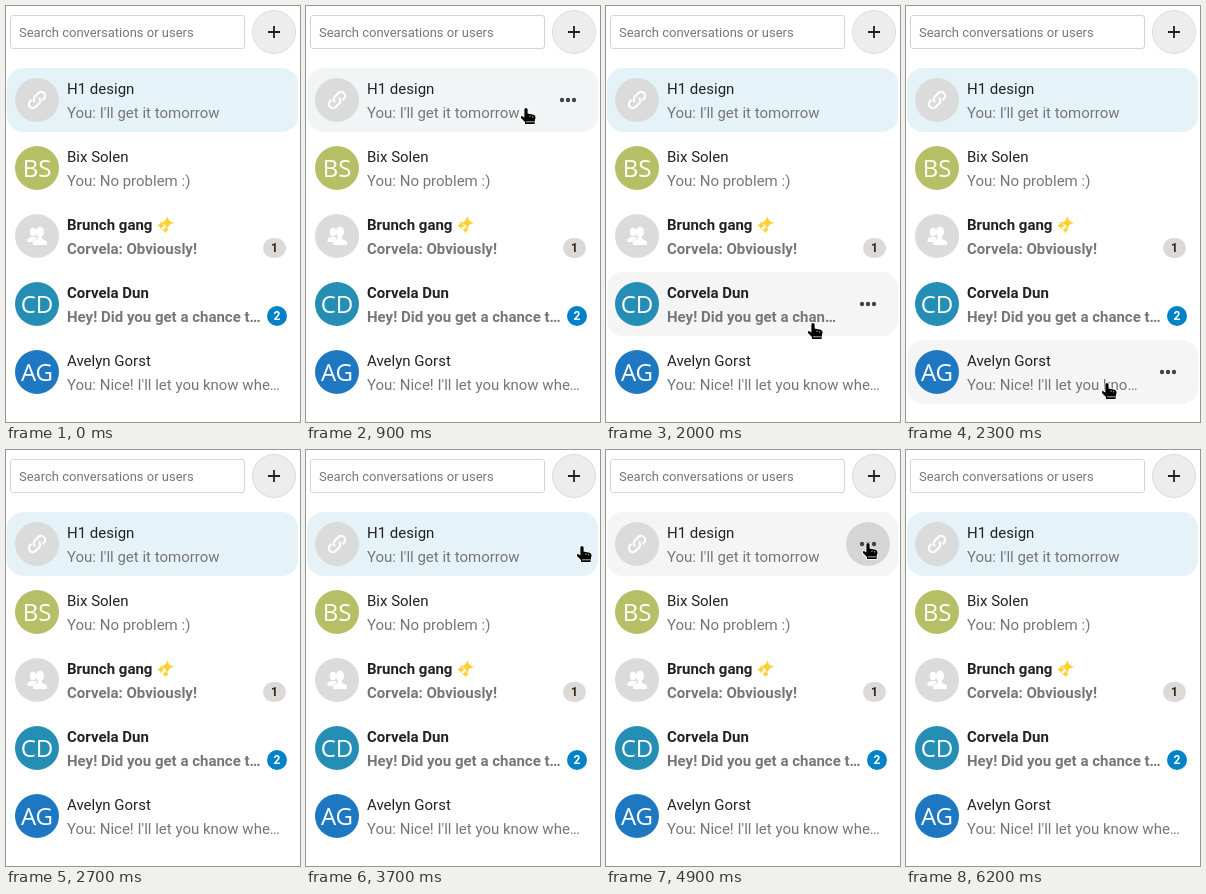
Animation of 294x416 px, one loop 8300 ms. Source, as an HTML page:

```html
<!DOCTYPE html>
<html lang="en">
<head>
<meta charset="utf-8">
<title>Conversation list</title>
<style>
  html, body { margin: 0; width: 100%; height: 100%; overflow: hidden; background: #fff; }
  body { position: relative; font: 15px/24px Roboto, sans-serif; color: #222; }
  body * { box-sizing: border-box; position: absolute; }
  .search { left: 4px; top: 9px; width: 235px; height: 34px; padding-left: 8px; border: 1px solid #d4d4d4;
    border-radius: 3px; font-size: 13px; line-height: 33px; color: #767676; }
  .add { left: 246px; top: 4px; width: 44px; height: 44px; border: 1px solid #dbdbdb; border-radius: 50%; background: #ededed; }
  .row { left: 1px; width: 291px; height: 64px; border-radius: 16px; }
  .avatar { left: 8px; top: 10px; width: 44px; height: 44px; border-radius: 50%; color: #fff; text-align: center;
    font: 24px/43px "Open Sans", "Noto Sans", sans-serif; }
  .avatar svg { left: 0; top: 0; }
  .name, .message { left: 60px; white-space: nowrap; }
  .name { top: 9px; }
  .message { top: 33px; color: #767676; overflow: hidden; text-overflow: ellipsis; }
  .unread { font-weight: bold; }
  .badge { top: 34px; height: 20px; border-radius: 10px; font: bold 12px/20px Roboto, sans-serif; text-align: center; }
  .more { left: 239px; top: 10px; width: 44px; height: 44px; border-radius: 50%; }
  .sparkles { left: 150px; top: 11px; }
  #cursor { left: 0; top: 0; overflow: visible; }
</style>
</head>
<body>
<div class="search">Search conversations or users</div>
<div class="add"><svg width="42" height="42" style="left:0;top:0"><path d="M15 21H27M21 15V27" stroke="#222" stroke-width="1.8"/></svg></div>
<svg id="cursor" width="1" height="1">
  <path d="M-1.6 1.6a1.6 1.6 0 0 1 3.2 0V5.5l6 1.2q2 .5 2 2.7l-1 4V16H-1V14l-4-4q-.6-1.8 1-1.9l2.4 1.5z"
    fill="#000" stroke="#fff" stroke-width="1.6" paint-order="stroke"/>
  <path d="M4 7.5V9M6.7 8V9.5M0 13.8H8" stroke="#fff" stroke-width=".7"/>
</svg>

<script>
const LOOP = 8300, STEP = 100;

const linkHalf = '<path d="M9.9 14.1a4 4 0 0 1 0-5.65l3.5-3.5a4 4 0 0 1 5.65 5.65l-1.5 1.5"';
const icon = body => `<svg width="44" height="44">${body}</svg>`;
const linkIcon = icon(`<g transform="translate(10 10)" fill="none" stroke="#fff" stroke-width="2.2">
  ${linkHalf}/>${linkHalf} transform="rotate(180 12 12)"/></g>`);
const groupIcon = icon(`<g fill="#fff"><ellipse cx="18" cy="18" rx="3.2" ry="4.2"/>
  <path d="M12.5 28v-2q0-2 4-3h5v5z"/>
  <g stroke="#dbdbdb" paint-order="stroke"><path d="M18 31v-2.5q0-2 5-3.5V22h4v3q5 1.5 5 3.5V31z"/></g>
  <ellipse cx="25" cy="18" rx="4" ry="5.4"/></g>`);
const star = (x, y, r) => `<path d="M${x} ${y - r}Q${x + r * .15} ${y - r * .15} ${x + r} ${y}Q${x + r * .15} ${y + r * .15} ${x} ${y + r}
  Q${x - r * .15} ${y + r * .15} ${x - r} ${y}Q${x - r * .15} ${y - r * .15} ${x} ${y - r}"/>`;
const sparkles = `<svg class="sparkles" width="18" height="20" fill="#fcd02f" stroke="#fcd02f" stroke-width=".6">
  ${star(10.3, 7.8, 6)}${star(4, 10.5, 3.2)}${star(8.5, 15, 2.8)}</svg>`;

const chats = [
  { name: 'H1 design', message: "You: I'll get it tomorrow", color: '#dbdbdb', avatar: linkIcon, active: true },
  { name: 'Bix Solen', message: 'You: No problem :)', color: '#b6bf66', avatar: 'BS' },
  { name: 'Brunch gang', message: 'Corvela: Obviously!', color: '#dbdbdb', avatar: groupIcon, extra: sparkles,
    badge: 1, badgeStyle: 'left:256px;width:23px;background:#dcd9d9;color:#321' },
  { name: 'Corvela Dun', message: 'Hey! Did you get a chance to look at it?', color: '#248eb5', avatar: 'CD',
    badge: 2, badgeStyle: 'left:260px;width:20px;background:#0082c9;color:#fff' },
  { name: 'Avelyn Gorst', message: "You: Nice! I'll let you know when it is done", color: '#1e78c1', avatar: 'AG' },
];

const rows = chats.map((chat, i) => {
  const el = document.createElement('div');
  const unread = chat.badge ? 'unread' : '';
  el.className = 'row';
  el.style.top = 62 + 68 * i + 'px';
  el.innerHTML = `<div class="avatar" style="background:${chat.color}">${chat.avatar}</div>
    <div class="name ${unread}">${chat.name}</div>${chat.extra || ''}
    <div class="message ${unread}">${chat.message}</div>
    ${chat.badge ? `<div class="badge" style="${chat.badgeStyle}">${chat.badge}</div>` : ''}
    <div class="more">${icon('<g fill="#444"><circle cx="16" cy="22" r="2.2"/><circle cx="22" cy="22" r="2.2"/><circle cx="28" cy="22" r="2.2"/></g>')}</div>`;
  cursor.before(el);
  const part = name => el.querySelector('.' + name);
  return { el, chat, message: part('message'), badge: part('badge'), more: part('more') };
});

// Pointer visits as [time, x, y] of the fingertip
const visits = [
  [[500, 230, 1], [900, 220, 102], [1300, 217, 194], [1600, 216, 236], [2300, 201, 377], [2400, 200, 388]],
  [[3700, 276, 96], [4300, 193, 98], [4400, 193, 98], [4900, 262, 93], [5800, 262, 93], [5900, 270, 102]],
];

function pointerAt(t) {
  const path = visits.find(v => t >= v[0][0] && t <= v.at(-1)[0]);
  if (!path) return null;
  const k = Math.max(1, path.findIndex(p => p[0] >= t));
  const [a, b] = [path[k - 1], path[k]];
  const f = (t - a[0]) / (b[0] - a[0]);
  return { x: a[1] + (b[1] - a[1]) * f, y: a[2] + (b[2] - a[2]) * f };
}

function isOver(i, p) {
  const top = 62 + 68 * i;
  return Boolean(p) && p.y >= top && p.y < top + 64;
}

const mix = (a, b, f) => `rgb(${a.map((v, i) => Math.round(v + (b[i] - v) * f))})`;

function draw(t) {
  const pointer = pointerAt(t);
  // Hover trails the pointer by one step, then settles over another
  const last = pointerAt(t - STEP), earlier = pointerAt(t - 2 * STEP);
  cursor.style.display = pointer ? '' : 'none';
  if (pointer) cursor.style.transform = `translate(${Math.round(pointer.x)}px, ${Math.round(pointer.y)}px)`;

  rows.forEach(({ el, chat, message, badge, more }, i) => {
    const hover = isOver(i, last);
    const level = .8 * hover + .2 * isOver(i, earlier);
    el.style.background = mix(chat.active ? [229, 243, 249] : [255, 255, 255], [245, 245, 245], level);
    message.style.width = (hover ? 175 : badge ? 196 : 215) + 'px';
    if (badge) badge.style.display = hover ? 'none' : '';
    more.style.display = hover ? '' : 'none';
    more.style.background = hover && last.x >= 240 ? '#d5d5d5' : 'none';
  });
}

function frame() {
  const t = performance.now() % LOOP;
  draw(Math.floor(t / STEP) * STEP);
  requestAnimationFrame(frame);
}
frame();
</script>
</body>
</html>
```
